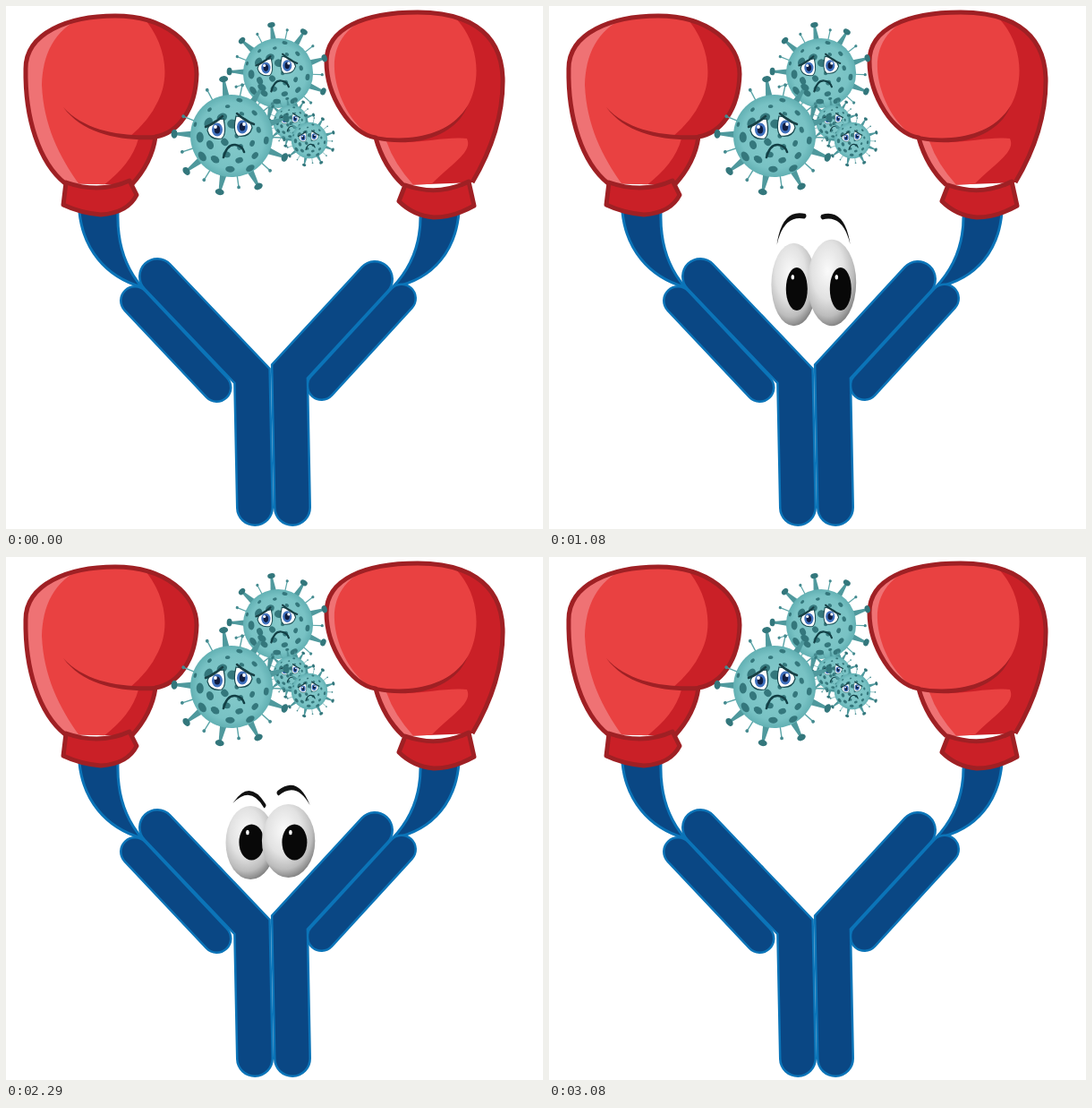
An HTML page for the animation above (3160 ms loop, 600 by 584 pixels).

```html
<!DOCTYPE html>
<html lang="en">
<head>
<meta charset="utf-8">
<title>Antibody boxer</title>
<style>
html, body { margin: 0; width: 100%; height: 100%; overflow: hidden; background: #fff; }
svg { display: block; width: 100vw; height: 100vh; }
.line { fill: none; stroke-linecap: round; stroke-linejoin: round; }
.rim { stroke: #9f2024; stroke-width: 5; stroke-linejoin: round; }
.blue { fill: #0a4784; stroke: #0b74b8; stroke-width: 3; stroke-linejoin: round; }
.bar { fill: none; stroke-linecap: round; stroke-linejoin: miter; }
.dark { fill: #ca2027; }
.red { fill: #e94141; }
.shine { fill: #ef7274; }
</style>
</head>
<body>
<svg viewBox="0 0 600 584">
  <defs>
    <radialGradient id="ball" cx=".42" cy=".36" r=".66">
      <stop offset="0" stop-color="#fafafa"/>
      <stop offset=".5" stop-color="#e2e2e2"/>
      <stop offset=".8" stop-color="#bcbcbc"/>
      <stop offset="1" stop-color="#808080"/>
    </radialGradient>
    <radialGradient id="skin">
      <stop offset="0" stop-color="#86cacb"/>
      <stop offset=".8" stop-color="#78c2c4"/>
      <stop offset="1" stop-color="#62b0b3"/>
    </radialGradient>
    <path id="leftGlove" d="M66 198C37 175 21 125 22 70C22 30 70 11 122 11C178 11 213 42 213 76C212 116 192 142 167 146C164 168 154 185 140 200"/>
    <path id="rightGlove" d="M444 200C428 185 418 165 413 147C385 143 358 100 358 62C358 25 400 7 460 7C510 7 553 25 555 80C556 125 540 165 521 197"/>
    <clipPath id="leftClip"><use href="#leftGlove"/></clipPath>
    <clipPath id="rightClip"><use href="#rightGlove"/></clipPath>
    <g id="sadEye">
      <path d="M-10 3Q-8-8 8-10Q12 7 6 12Q-7 14-10 3Z" fill="#fff" stroke="#174a50" stroke-width="1.2"/>
      <ellipse cx="1" cy="2" rx="6" ry="7.500" fill="#3f70bd"/>
      <ellipse cx="1" cy="2" rx="3.200" ry="4.500" fill="#101d40"/>
      <circle cx="-1" cy="-1" r="1.900" fill="#fff"/>
      <path class="line" d="M-12-1Q-3-4 7-13" stroke="#173f45" stroke-width="2.500"/>
    </g>
  </defs>

  <path class="blue" d="M82 230C86 270 110 302 152 314C131 290 124 262 125 230Z"/>
  <path class="blue" d="M506 230C503 270 480 305 432 314C455 290 464 260 463 230Z"/>
  <g id="bars"></g>

  <g clip-path="url(#leftClip)">
    <path class="dark" d="M0 0H230V220H0Z"/>
    <path class="red" d="M0 0H140C174 27 187 72 170 106Q160 128 137 147L148 148C142 170 127 187 104 204L0 220Z"/>
    <path class="shine" d="M0 0L85 13C53 27 41 55 40 88C42 135 61 172 87 206L0 220Z"/>
  </g>
  <use href="#leftGlove" class="rim" fill="none"/>
  <path fill="#9f2024" d="M64 113C88 140 130 146 168 144L167 149C128 151 86 143 64 113Z"/>
  <path class="dark rim" d="M67 197Q105 210 138 195L146 211Q136 231 106 233Q83 231 64 222Z"/>

  <g clip-path="url(#rightClip)">
    <path class="dark" d="M340 0H570V220H340Z"/>
    <path class="red" d="M340 0H485C528 25 534 79 516 111C498 142 452 156 413 148L340 150Z"/>
    <path class="shine" d="M340 0L418 8C374 21 363 50 368 80C373 109 389 134 410 148L340 150Z"/>
    <path class="red" d="M413 148C453 158 485 145 515 148C523 165 490 180 468 207H440Z"/>
    <path class="shine" d="M410 146L425 151Q435 180 462 207H440Z"/>
  </g>
  <use href="#rightGlove" class="rim" fill="none"/>
  <path fill="#9f2024" d="M412 145C455 153 499 142 516 111C502 146 457 159 412 149Z"/>
  <path class="dark rim" d="M446 200Q483 213 517 196L523 223Q500 236 478 236Q455 234 439 218Z"/>

  <g id="viruses"></g>
  <g id="face"></g>
</svg>
<script>
const LOOP = 3160;
const $ = id => document.getElementById(id);

function bar(d, width) {
  return `<path class="bar" d="${d}" stroke="#0b74b8" stroke-width="${width + 5}"/>
    <path class="bar" d="${d}" stroke="#0a4784" stroke-width="${width}"/>`;
}

$("bars").innerHTML =
  bar("M144 329L235.500 426", 29) + bar("M442 326.500L352.500 424", 29) +
  bar("M169 302L275 413L278 560", 37) + bar("M412 305L317 408L320 560", 37);

// Long and short spikes alternate; no long one grows at the gap angle.
function virus(x, y, scale, gap) {
  let out = "";
  for (let a = 22; a < 382; a += 40) {
    if (a !== gap) out += `<g transform="rotate(${a})">
      <path d="M42-4L62-1.500V1.500L42 4Z" fill="#4f999d"/>
      <ellipse cx="64" rx="3.500" ry="5" fill="#33777c"/></g>`;
    out += `<g transform="rotate(${a + 20})"><path d="M43 0H57" stroke="#5ba5a8" stroke-width="1.400"/>
      <circle cx="58" r="1.900" fill="#458b90"/></g>`;
  }
  out += '<circle r="46" fill="url(#skin)"/>';
  const spots = 26;
  for (let i = 0; i < spots; i++) {
    const r = 43 * Math.sqrt((i + .5) / spots);
    const size = 2.4 + (i * 7 % 5) * .7;
    out += `<ellipse transform="rotate(${i * 137.5})" cx="${r}" rx="${size * (1.1 - r / 110)}" ry="${size * 1.15}" fill="#34777c"/>`;
  }
  return `<g transform="translate(${x} ${y}) scale(${scale})">${out}
    <use href="#sadEye" transform="translate(-17 -9)"/>
    <use href="#sadEye" transform="translate(13 -12) scale(-1 1)"/>
    <path class="line" d="M-9 24Q-5 9 4 10Q12 11 14 18" stroke="#123f45" stroke-width="2.600"/></g>`;
}

$("viruses").innerHTML =
  virus(304, 75, .85, 142) + virus(318, 130, .42) + virus(252, 145, 1, 222) + virus(339, 150, .44);

// x: middle of the eyes; tall: egg shape (1) or round (0); gaze, look: pupil offsets;
// tip, rise: height of a brow's outer tip and how far its inner end stands above it
const glanceLeft = { x: 285.3, tall: 1, gaze: -11, look: -1, browX: 288.5, tipL: 263, riseL: 26, tipR: 263, riseR: 24 };
const glanceRight = { x: 294.8, tall: 1, gaze: 6.5, look: 6, browX: 295.5, tipL: 267, riseL: 35, tipR: 266, riseR: 33 };
const suspicious = { x: 294.4, tall: 0, gaze: -14, look: .5, browX: 290.5, tipL: 265, riseL: 21, tipR: 279, riseR: 8 };
const doubtful = { ...suspicious, gaze: 4, browX: 296.5, tipL: 275, riseL: 0, tipR: 277, riseR: 16 };
const ahead = { ...doubtful, gaze: -2, riseR: 0 };

// Each move runs between two ticks, and the whole face swells by "pop" on the way.
const moves = [
  { start: 0, end: 3, pose: glanceLeft, pop: .07 },
  { start: 4, end: 7, pose: glanceRight, pop: .08 },
  { start: 11, end: 15, pose: suspicious, pop: .14 },
  { start: 18, end: 22, pose: doubtful, pop: 0 },
  { start: 24, end: 28, pose: ahead, pop: .1 },
  { start: 28, end: 32, pose: ahead, pop: .1 }
];
const LAST_TICK = 31;

// Ten ticks a second, snapped to a 24 fps clock.
const tickStart = n => Math.round(Math.round(n * 2.4) * 100 / 24) * 10;
function tickAt(ms) {
  let n = 0;
  while (n < LAST_TICK && tickStart(n + 1) <= ms) n++;
  return n;
}

const lerp = (a, b, k) => a + (b - a) * k;
const ease = k => k * k * (3 - 2 * k);

function stateAt(n) {
  const i = moves.findLastIndex(m => m.start <= n);
  const { start, end, pose, pop } = moves[i];
  const from = moves[Math.max(0, i - 1)].pose;
  const k = Math.min(1, (n - start) / (end - start));
  const now = {};
  for (const key in pose) now[key] = lerp(from[key], pose[key], ease(k));
  return { now, scale: 1 + pop * Math.sin(Math.PI * k) };
}

const ellipse = (cx, cy, rx, ry, fill) =>
  `<ellipse cx="${cx}" cy="${cy}" rx="${rx}" ry="${ry}" fill="${fill}"/>`;

// side is -1 for the left eye and 1 for the right one
function eye(p, side) {
  const cx = p.x + side * 21.2, cy = lerp(318, 310, p.tall) - side;
  const px = cx + p.gaze + side * (2 + p.gaze * .2), py = 318 - p.tall * 8 + p.look;
  const pry = lerp(20, 24, p.tall);
  return ellipse(cx, cy, lerp(28.7, 26.2, p.tall) + side, lerp(41, 47.2, p.tall) + side * p.tall, "url(#ball)") +
    ellipse(px, py, lerp(14, 12, p.tall), pry, "#080808") +
    ellipse(px - 4.5, py - pry * .55, 1.8, 2.8, "#fff");
}

function brow(p, side) {
  const tip = side < 0 ? p.tipL : p.tipR, rise = side < 0 ? p.riseL : p.riseR;
  const x = p.browX + side * 25, half = side * (18 - 2 * p.tall);
  const bendX = x + side * rise * .3, bendY = tip - 28 - rise * .38;
  return `<path fill="#111" d="M${x + half} ${tip}Q${bendX} ${bendY} ${x - half} ${tip - rise}
    q${-side * 2.5} 3 ${side} 5.500Q${bendX - side * 2} ${bendY + 7} ${x + half} ${tip}Z"/>`;
}

function draw(ms) {
  const n = tickAt(ms);
  if (n === 0 || n === LAST_TICK) {
    $("face").innerHTML = "";
    return;
  }
  const { now, scale } = stateAt(n);
  $("face").setAttribute("transform", `translate(294.400 318) scale(${scale}) translate(-294.400 -318)`);
  $("face").innerHTML = [-1, 1].map(s => eye(now, s)).join("") + [-1, 1].map(s => brow(now, s)).join("");
}

function loop() {
  draw(performance.now() % LOOP);
  requestAnimationFrame(loop);
}

loop();
</script>
</body>
</html>
```
